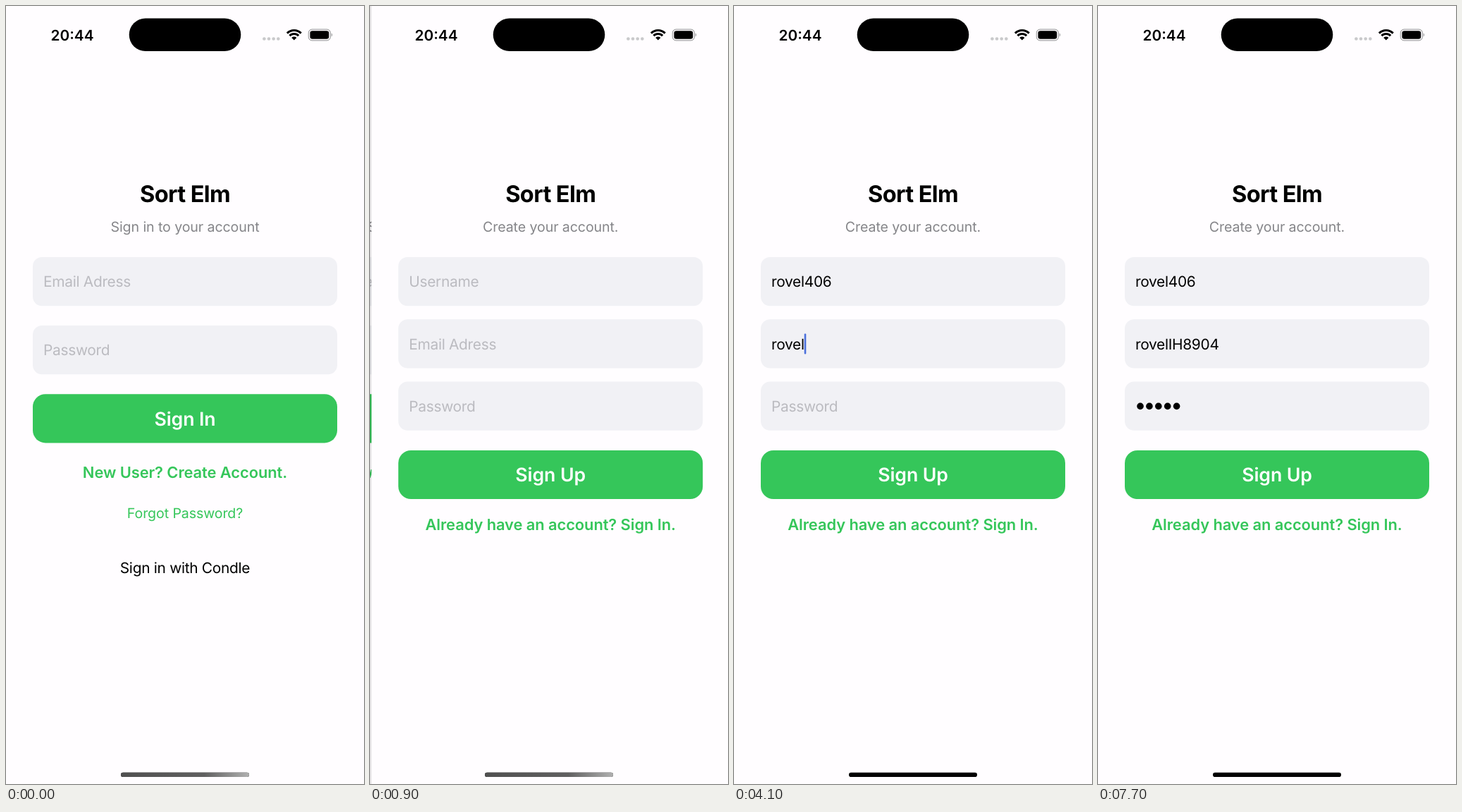
Write an HTML page that moves like this. It is 508 px wide and 1103 px high and loops after 8 s.

```html
<!DOCTYPE html>
<html lang="en">
<head>
<meta charset="utf-8">
<title>Sign up</title>
<style>
  html, body { margin: 0; width: 100%; height: 100%; overflow: hidden; background: #fffdff; }
  svg { display: block; width: 508px; height: 1103px; }
  text {
    font-family: Inter, "Liberation Sans", sans-serif;
    font-optical-sizing: none;
    text-rendering: geometricPrecision;
    white-space: pre;
  }
  .title { font-size: 32.5px; font-weight: 700; letter-spacing: -.6px; }
  .sub { font-size: 19.6px; letter-spacing: -.1px; fill: #858589; }
  .body { font-size: 20.9px; letter-spacing: -.3px; }
  .hint { fill: #bbbbc0; }
  .button { font-size: 26.7px; font-weight: 600; letter-spacing: -.1px; fill: #fff; }
  .link { font-size: 21.9px; font-weight: 600; letter-spacing: -.08px; }
  .green { fill: #35c65a; }
  .clock { font-size: 20.8px; font-weight: 600; }
</style>
</head>
<body>
<svg id="stage" viewBox="0 0 508 1103">
  <defs>
    <linearGradient id="shine">
      <stop offset="0" stop-color="#505050"/>
      <stop offset=".65" stop-color="#606060"/>
      <stop offset="1" stop-color="#b0b0b0"/>
    </linearGradient>
  </defs>
  <g id="signIn"></g>
  <rect id="dim" width="508" height="1103" opacity="0"/>
  <g id="signUp"></g>
  <g id="status">
    <text class="clock" x="94" y="48.8" text-anchor="middle">20:44</text>
    <rect x="174.7" y="17.5" width="158.6" height="46.5" rx="23.2"/>
    <g fill="#c9c9cb">
      <circle cx="366.4" cy="46.5" r="2.3"/><circle cx="373" cy="46.5" r="2.3"/>
      <circle cx="379.7" cy="46.5" r="2.3"/><circle cx="386.3" cy="46.5" r="2.3"/>
    </g>
    <g fill="none" stroke="#000" stroke-width="3.1">
      <path d="M398.9 38.6a14 14 0 0 1 19.8 0"/>
      <path d="M402.4 42.1a9 9 0 0 1 12.8 0"/>
    </g>
    <path d="M405.2 44.9a5.1 5.1 0 0 1 7.2 0l-3.6 3.7z"/>
    <rect x="429.3" y="33.2" width="31" height="15.6" rx="5" fill="none" stroke="#a3a3a5" stroke-width="1.2"/>
    <rect x="431.4" y="35.2" width="26.8" height="11.6" rx="3.3"/>
    <path d="M461.7 38.3q3 2.7 0 5.4z" fill="#a3a3a5"/>
  </g>
  <rect x="163" y="1086.8" width="182" height="6.2" rx="3.1"/>
  <rect id="shineBar" x="163" y="1086.8" width="182" height="6.2" rx="3.1" fill="url(#shine)"/>
</svg>
<script>
const LOOP = 8000, STEP = 100, WIDTH = 508;
const $ = id => document.getElementById(id);
const signIn = $('signIn'), signUp = $('signUp');

function add(parent, tag, attrs, content) {
  const el = document.createElementNS('http://www.w3.org/2000/svg', tag);
  for (const key in attrs) el.setAttribute(key, attrs[key]);
  if (content) el.textContent = content;
  return parent.appendChild(el);
}

const centered = (page, y, cls, content) =>
  add(page, 'text', { x: 254, y, class: cls, 'text-anchor': 'middle' }, content);

function heading(page, subtitle) {
  add(page, 'rect', { width: WIDTH, height: 1103, fill: '#fffdff' });
  centered(page, 277.5, 'title', 'Sort Elm');
  centered(page, 320.2, 'sub', subtitle);
}

function field(page, y, hint) {
  add(page, 'rect', { x: 38, y, width: 432, height: 69.2, rx: 13, fill: '#f1f1f5' });
  return add(page, 'text', { x: 53, y: y + 42.2, class: 'body hint' }, hint);
}

function button(page, y, label) {
  add(page, 'rect', { x: 38, y, width: 432, height: 69.2, rx: 18, class: 'green' });
  centered(page, y + 44.5, 'button', label);
}

heading(signIn, 'Sign in to your account');
field(signIn, 356, 'Email Adress');
field(signIn, 453, 'Password');
button(signIn, 550.2, 'Sign In');
centered(signIn, 669.4, 'link green', 'New User? Create Account.');
centered(signIn, 725.6, 'sub', 'Forgot Password?').style.fill = '#35c65a';
centered(signIn, 804, 'body', 'Sign in with Condle');

heading(signUp, 'Create your account.');
const rows = [356, 444.3, 532.6];
const hints = ['Username', 'Email Adress', 'Password'];
const labels = rows.map((y, i) => field(signUp, y, hints[i]));
button(signUp, 629.9, 'Sign Up');
centered(signUp, 743.3, 'link green', 'Already have an account? Sign In.');

const dots = [0, 1, 2, 3, 4].map(i =>
  add(signUp, 'circle', { cx: 60 + i * 12.9, cy: 567.4, r: 4.8 }));
const caret = add(signUp, 'rect', { width: 2.6, height: 29, rx: 1, fill: '#4a70dc' });

// Key press times for each field
const typed = [
  { text: 'rovel406', keys: [1900, 2000, 2100, 2200, 2400, 2500, 2800, 3000] },
  { text: 'rovelIH8904', keys: [3500, 3700, 3800, 3900, 4100, 4400, 4800, 5300, 5400, 5600, 5700] },
  { keys: [6500, 6600, 6700, 6900, 7100] }
];

// [time, field, caret opacity]
const focus = [
  [0, 0, 0], [1200, 0, .5], [1300, 0, 1], [3300, 1, 1], [6200, 1, .5],
  [6300, 1, 0], [6400, 2, 1], [7600, 2, .5], [7700, 2, 0]
];

// Remaining travel of a critically damped push
function pushLeft(t) {
  if (t < 500) return 1;
  if (t >= 1000) return 0;
  const a = (t - 456) * .0171;
  return (1 + a) * Math.exp(-a);
}

function render(t) {
  const left = pushLeft(t), done = 1 - left;
  signUp.setAttribute('transform', `translate(${WIDTH * left} 0)`);
  signIn.setAttribute('transform', `translate(${-.3 * WIDTH * done} 0)`);
  $('dim').setAttribute('opacity', .1 * done);
  $('shineBar').setAttribute('opacity', Math.min(1, Math.max(0, (1400 - t) / 300)));

  const counts = typed.map(f => f.keys.filter(k => k <= t).length);
  labels.forEach((label, i) => {
    const n = counts[i], text = typed[i].text;
    label.textContent = n ? (text ? text.slice(0, n) : '') : hints[i];
    label.classList.toggle('hint', !n);
  });
  dots.forEach((dot, i) => dot.setAttribute('opacity', i < counts[2] ? 1 : 0));

  const [, row, opacity] = focus.filter(f => f[0] <= t).pop();
  const n = counts[row];
  const end = !n ? 0 : row === 2 ? n * 12.9 : labels[row].getComputedTextLength();
  caret.setAttribute('x', 53 + end);
  caret.setAttribute('y', rows[row] + 20.2);
  caret.setAttribute('opacity', opacity);
}

let last = -1;
function tick() {
  const t = Math.floor(performance.now() % LOOP / STEP) * STEP;
  if (t !== last) render(last = t);
  requestAnimationFrame(tick);
}
tick();
</script>
</body>
</html>
```
